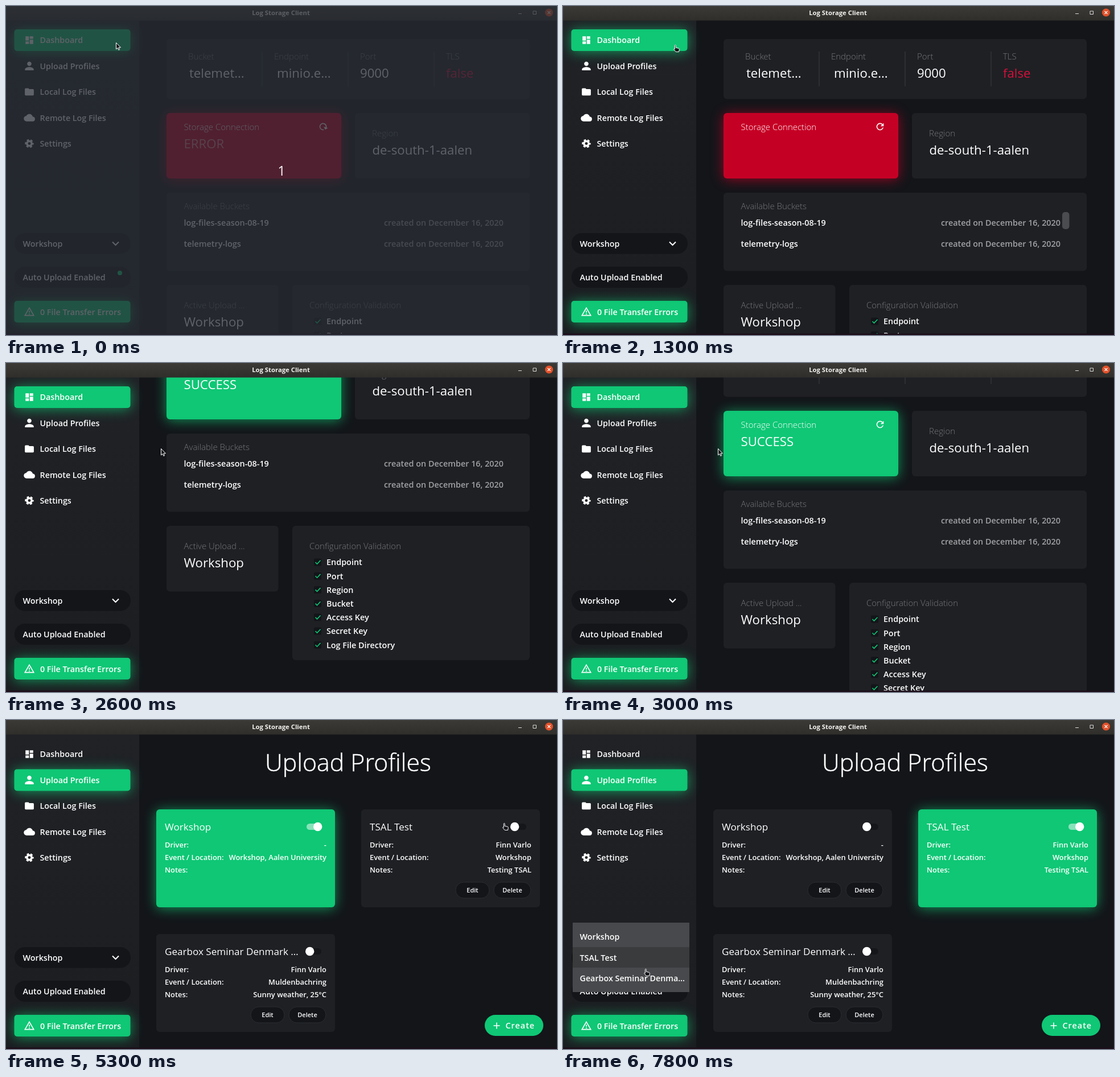
Recreate the animation shown at these times as an HTML page. Size 968 by 578 pixels, loop 8000 ms.

```html
<!DOCTYPE html>
<html lang="en">
<head>
<meta charset="utf-8">
<title>Log Storage Client</title>
<style>
  html, body { margin: 0; width: 100%; height: 100%; overflow: hidden; background: #131519; }
  svg { display: block; width: 968px; height: 578px; }
  text { font: 600 14.4px "Open Sans", "Noto Sans", sans-serif; fill: #fff; white-space: pre; }
  .nav { font-size: 14.3px; }
  .label { font-weight: 300; font-size: 15px; fill: #77787b; }
  .big { font-weight: 400; font-size: 22.2px; }
  .date { fill: #a0a1a3; }
  .title { font-weight: 300; font-size: 42.8px; stroke: #fff; stroke-width: .5; }
  .name { font-weight: 400; font-size: 17.1px; }
  .body { font-size: 12.9px; }
  .small { font-size: 11px; }
  .bar { font-weight: 700; font-size: 11.3px; fill: #f2f1ef; }
  .create { letter-spacing: 1px; }
  .count { font-weight: 400; font-size: 23px; }
  .white { fill: #fff; }
  .glow { filter: blur(11px); opacity: .7; }
  .green { color: #0fc775; }
  .line { fill: none; stroke: #fff; stroke-width: 2; }
</style>
</head>
<body>
<svg id="stage" viewBox="0 0 968 578" xmlns="http://www.w3.org/2000/svg"></svg>
<script>
const LOOP = 8000, STEP = 100;
const PANEL = '#1f2024', DARK = '#131519', GREEN = '#0fc775';

// Markup helpers
const text = (x, y, s, cls = '', anchor = 'start', id = '') =>
  `<text x="${x}" y="${y}" class="${cls}" text-anchor="${anchor}" id="${id}">${s}</text>`;
const rect = (x, y, w, h, r, fill, more = '') =>
  `<rect x="${x}" y="${y}" width="${w}" height="${h}" rx="${r}" fill="${fill}" ${more}/>`;
const group = (id, inner, more = '') => `<g id="${id}" ${more}>${inner}</g>`;
const glowBox = (id, x, y, w, h, r) => group(id,
  rect(x, y + 2, w, h, r, 'currentColor', 'class="glow"') + rect(x, y, w, h, r, 'currentColor'),
  'class="green"');
const icon = (cx, cy, size, shape) =>
  `<g class="white" transform="translate(${cx - size / 2} ${cy - size / 2}) scale(${size / 24})">${shape}</g>`;
const path = d => `<path d="${d}"/>`;

const icons = {
  board: path('M3 13h8V3H3zm0 8h8v-6H3zm10 0h8V11h-8zm0-18v6h8V3z'),
  person: path('M12 12c2.2 0 4-1.8 4-4s-1.8-4-4-4-4 1.8-4 4 1.8 4 4 4zm0 2c-2.7 0-8 1.3-8 4v2h16v-2c0-2.7-5.3-4-8-4z'),
  folder: path('M10 4H4a2 2 0 0 0-2 2v12a2 2 0 0 0 2 2h16a2 2 0 0 0 2-2V8a2 2 0 0 0-2-2h-8z'),
  cloud: path('M19.4 10C18.7 6.6 15.6 4 12 4 9.1 4 6.6 5.6 5.4 8 2.3 8.4 0 10.9 0 14a6 6 0 0 0 6 6h13a5 5 0 0 0 .4-10z'),
  gear: '<g fill="none" stroke="#fff"><circle cx="12" cy="12" r="5.6" stroke-width="4.6"/>' +
    '<circle cx="12" cy="12" r="8.6" stroke-width="3.4" stroke-dasharray="5 4" stroke-dashoffset="2.5"/></g>',
  refresh: path('M17.7 6.3A8 8 0 1 0 19.7 14h-2.1A6 6 0 1 1 16.2 7.8L13 11h7V4z'),
  warn: path('M12 6l7.5 13h-15zM12 2L1 21h22zm1 14h-2v2h2zm0-6h-2v4h2z').replace('/>', ' fill-rule="evenodd"/>')
};

function dashboard() {
  const facts = [['Bucket', 'telemet…', 320, 322], ['Endpoint', 'minio.e…', 471, 476],
    ['Port', '9000', 622, 622], ['TLS', 'false', 773, 773]];
  const checks = ['Endpoint', 'Port', 'Region', 'Bucket', 'Access Key', 'Secret Key', 'Log File Directory'];
  const buckets = ['log-files-season-08-19', 'telemetry-logs'];
  return rect(282, 58, 638, 105.5, 6, PANEL) +
    facts.map(([k, v, x, vx], i) => text(x, 94, k, 'label') +
      text(vx, 126, v, 'big').replace('<text', i == 3 ? '<text style="fill:#d6103c"' : '<text') +
      (i ? rect(x - 21.5, 80, 1, 61, 0, '#3b3c40') : '')).join('') +
    glowBox('storage', 282, 188, 307, 115, 6) +
    text(312.5, 217.5, 'Storage Connection', 'label').replace('<text', '<text style="fill:#fff"') +
    text(312.5, 250, 'ERROR', 'big', 'start', 'state') +
    group('refresh', icon(557, 212, 19, icons.refresh)) +
    rect(613, 188, 307, 115, 6, PANEL) +
    text(643, 229, 'Region', 'label') + text(643.5, 261, 'de-south-1-aalen', 'big') +
    rect(282, 328, 638, 137.5, 6, PANEL) + text(312.5, 356.5, 'Available Buckets', 'label') +
    group('', group('rows', buckets.map((b, i) => text(312.5, 386 + i * 36.5, b) +
      text(874, 386 + i * 36.5, 'created on December 16, 2020', 'date', 'end')).join('')), 'clip-path="url(#list)"') +
    rect(877, 362, 12.5, 30, 5, '#4b4c50', 'id="thumb"') +
    rect(282, 490, 196.5, 115.5, 6, PANEL) +
    text(312.5, 531, 'Active Upload …', 'label') + text(312.5, 563, 'Workshop', 'big') +
    rect(503, 490, 417, 236, 6, PANEL) + text(533, 531, 'Configuration Validation', 'label') +
    checks.map((c, i) => {
      const y = 554 + i * 24.2;
      return rect(541, y - 6.5, 13, 13, 2, DARK) + text(563, y + 5.3, c) +
        `<path d="M543.5 ${y}l3 3 6-6.3" class="line" style="stroke:${GREEN};stroke-width:1.6"/>`;
    }).join('');
}

function profile(id, x, y, name, driver, place, notes) {
  const button = (bx, w, s) => rect(bx, y + 128, w, 28, 14, DARK, 'stroke="#2b2c31"') +
    text(bx + w / 2, y + 146.3, s, 'small', 'middle');
  const lines = [['Driver:', driver], ['Event / Location:', place], ['Notes:', notes]];
  return rect(x, y, 314, 172, 6, PANEL) +
    group(id + 'Buttons', button(x + 166, 59, 'Edit') + button(x + 233, 65, 'Delete')) +
    glowBox(id + 'On', x, y, 314, 172, 6) +
    text(x + 15, y + 37, name, 'name') +
    lines.map(([k, v], i) => text(x + 15, y + 67.2 + i * 22, k, 'body') +
      text(x + 299, y + 67.2 + i * 22, v, 'body', 'end')).join('') +
    rect(x + 264, y + 25, 26, 11, 5.5, '#15161a', `id="${id}Track"`) +
    `<circle id="${id}Halo" cx="${x + 284}" cy="${y + 30.5}" r="18" fill="#000" opacity="0"/>` +
    `<circle id="${id}Knob" cx="${x + 270}" cy="${y + 30.5}" r="7.7" fill="#fff"/>`;
}

function profiles() {
  return text(601, 90, 'Upload Profiles', 'title', 'middle') +
    profile('first', 264, 157, 'Workshop', '-', 'Workshop, Aalen University', '') +
    profile('second', 624, 157, 'TSAL Test', 'Finn Varlo', 'Workshop', 'Testing TSAL') +
    profile('third', 264, 376, 'Gearbox Seminar Denmark …', 'Finn Varlo', 'Muldenbachring', 'Sunny weather, 25°C') +
    rect(841, 518, 103, 37, 18.5, GREEN) +
    '<path d="M856.5 537h11M862 531.5v11" class="line" style="stroke-width:1.6"/>' +
    text(877.5, 542.3, 'Create', 'create');
}

function sidebar() {
  const items = [['Dashboard', 'board', 18], ['Upload Profiles', 'person', 23], ['Local Log Files', 'folder', 19],
    ['Remote Log Files', 'cloud', 19.5], ['Settings', 'gear', 18]];
  return rect(0, 25, 234, 551, 0, 'url(#side)') +
    glowBox('navHome', 14.5, 41, 204, 38, 5) + glowBox('navUpload', 14.5, 86.4, 204, 38, 5) +
    items.map(([s, key, size], i) => icon(41, 60 + i * 45.4, size, icons[key]) +
      text(59.5, 65.4 + i * 45.4, s, 'nav')).join('') +
    rect(15, 399, 204, 36.5, 18, DARK) + text(29.5, 422.5, 'Workshop', 'nav', 'start', 'choice') +
    '<path d="M187 414.5l5.5 5.5 5.5-5.5" class="line"/>' +
    rect(15, 458, 204, 37, 18, DARK) + text(29.5, 482.3, 'Auto Upload Enabled', 'nav') +
    `<circle id="dot" cx="200" cy="469" r="4" fill="${GREEN}"/>` +
    glowBox('', 14.5, 518, 204, 38, 5) + icon(41, 537, 20, icons.warn) +
    text(60, 543, '0 File Transfer Errors', 'nav') +
    group('menu', rect(17, 356, 205, 122, 1, '#48494c') + rect(17, 399, 205, 36, 0, '#3a3b3d') +
      ['Workshop', 'TSAL Test', 'Gearbox Seminar Denma…'].map((s, i) => text(29.5, 386 + i * 36.5, s, 'nav')).join(''));
}

function titleBar() {
  return rect(0, 0, 968, 25.5, 0, 'url(#bar)') + text(483, 16, 'Log Storage Client', 'bar', 'middle') +
    '<path d="M900 13.5h6M926 9h5.5v5.5h-5.5z" class="line" style="stroke:#ddd;stroke-width:1"/>' +
    '<circle cx="954" cy="11.5" r="7" fill="#e2512a"/>' +
    '<path d="M951.5 9l5 5m0-5l-5 5" class="line" style="stroke-width:1.1"/>';
}

const stage = document.getElementById('stage');
const fade = (id, a, b) => `<linearGradient id="${id}" x2="0" y2="1"><stop stop-color="${a}"/>` +
  `<stop offset="1" stop-color="${b}"/></linearGradient>`;
stage.innerHTML = `<defs>${fade('side', '#202226', '#1b1d20')}${fade('bar', '#3b3a36', '#2f2e2b')}
  <clipPath id="list"><rect x="300" y="362" width="600" height="76"/></clipPath></defs>` +
  rect(0, 0, 968, 578, 0, DARK) +
  group('home', dashboard()) + group('upload', profiles()) + sidebar() + titleBar() +
  rect(0, 575.5, 968, 2.5, 0, '#1c0d1a') +
  rect(0, 0, 968, 578, 0, '#282c34', 'id="veil"') + text(484, 297.5, '1', 'count', 'middle', 'count') +
  group('cursor',
    '<path id="arrow" d="M.5.5v11.4l2.6-2.4 1.8 3.9 1.7-.8-1.7-3.7h3.6z"/>' +
    '<path id="hand" d="M2.4 1.4c0-1.4 1.9-1.4 1.9 0v3.9l4.7 1c1 .3 1.4 1 1.3 2l-.7 4.2H4.2L.8 8.3c-.4-1 .6-1.5 1.6-.6z"/>',
    'fill="#15161a" stroke="#fff"');

const el = {};
stage.querySelectorAll('[id]').forEach(n => { if (n.id) el[n.id] = n; });
const show = (n, o) => { n.style.opacity = o; };
const move = (n, x, y) => n.setAttribute('transform', `translate(${x} ${y})`);

// Motion helpers
const ramp = (t, a, b) => Math.min(1, Math.max(0, (t - a) / (b - a)));
const ease = (t, a, b) => { const k = ramp(t, a, b); return k * k * (3 - 2 * k); };
const mix = (a, b, k) => a + (b - a) * k;
function track(keys, t) {
  const i = Math.max(1, keys.findIndex(k => k[0] > t));
  if (t >= keys[keys.length - 1][0]) return keys[keys.length - 1].slice(1);
  const [a, b] = [keys[i - 1], keys[i]];
  const k = ease(t, a[0], b[0]);
  return [mix(a[1], b[1], k), mix(a[2], b[2], k), a[3]];
}

// time, x, y, hand
const pointer = [[0, 193, 64, 0], [500, 193, 64, 0], [900, 194, 68, 1], [1300, 194, 68, 1], [1500, 225, 92, 0],
  [1800, 280, 135, 0], [1900, 280, 135, 0], [2300, 272, 150, 0], [3500, 272, 150, 0], [3800, 203, 129, 0],
  [3900, 203, 129, 0], [4000, 167, 123, 1], [4100, 167, 123, 1], [4200, 148, 109, 1], [4700, 148, 109, 1],
  [4800, 240, 125, 0], [5200, 904, 182, 1], [5300, 872, 181, 1], [5400, 872, 181, 1], [5500, 884, 186, 1],
  [6300, 884, 186, 1], [6500, 720, 235, 0], [6900, 180, 410, 1], [7000, 167, 412, 1],
  [7400, 167, 412, 1], [7800, 142, 437, 1]];
const pageScroll = [[0, 0, 0], [1800, 0, 0], [2300, 204, 0], [2800, 204, 0], [3000, 104, 0], [3300, 104, 0], [3700, 0, 0]];
const listScroll = [[0, 0, 0], [500, 0, 0], [900, 9, 0], [1300, 0, 0]];

function toggle(id, x, k) {
  show(el[id + 'On'], k);
  show(el[id + 'Buttons'], 1 - k);
  el[id + 'Knob'].setAttribute('cx', x + mix(269.7, 283.7, k));
  el[id + 'Track'].setAttribute('fill', k > .5 ? '#87e3ba' : '#15161a');
}

function draw(t) {
  show(el.veil, .74 * (1 - ramp(t, 0, 600)));
  show(el.count, 1 - ramp(t, 0, 500));

  const onUpload = t >= 4500;
  el.home.style.display = onUpload ? 'none' : '';
  el.upload.style.display = onUpload ? '' : 'none';
  move(el.home, 0, -track(pageScroll, t)[0]);
  const nav = ease(t, 4400, 4800);
  show(el.navHome, 1 - nav);
  show(el.navUpload, nav);

  const ok = ease(t, 1300, 1950);
  const rgb = [[197, 15], [0, 199], [37, 117]].map(([a, b]) => Math.round(mix(a, b, ok)));
  el.storage.style.color = `rgb(${rgb})`;
  el.state.textContent = t < 1300 ? 'ERROR' : 'SUCCESS';
  show(el.state, t < 1300 ? .5 * (1 - ramp(t, 0, 400)) : ramp(t, 1300, 1500));
  el.refresh.setAttribute('transform', `rotate(${mix(60, 360, ramp(t, 0, 600))} 557 212)`);

  const list = track(listScroll, t)[0];
  move(el.rows, 0, -list);
  move(el.thumb, 0, list * 13 / 9);
  show(el.thumb, ramp(t, 500, 700) * (1 - ramp(t, 1800, 2200)));

  const swap = ease(t, 5500, 6000);
  toggle('first', 264, 1 - swap);
  toggle('second', 624, swap);
  toggle('third', 264, 0);
  show(el.secondHalo, .04 * ramp(t, 5500, 5700) * (1 - ramp(t, 7200, 7400)));
  el.choice.textContent = t < 5600 ? 'Workshop' : 'TSAL Test';
  show(el.dot, (t + 400) % 2000 < 1000 ? 1 : 0);
  show(el.menu, t >= 7300 ? 1 : 0);

  const [x, y, hand] = track(pointer, t);
  move(el.cursor, x, y);
  show(el.arrow, hand ? 0 : 1);
  show(el.hand, hand ? 1 : 0);
}

const start = performance.now();
function tick() {
  const t = (performance.now() - start) % LOOP;
  draw(Math.floor(t / STEP) * STEP);
  requestAnimationFrame(tick);
}
tick();
</script>
</body>
</html>
```
